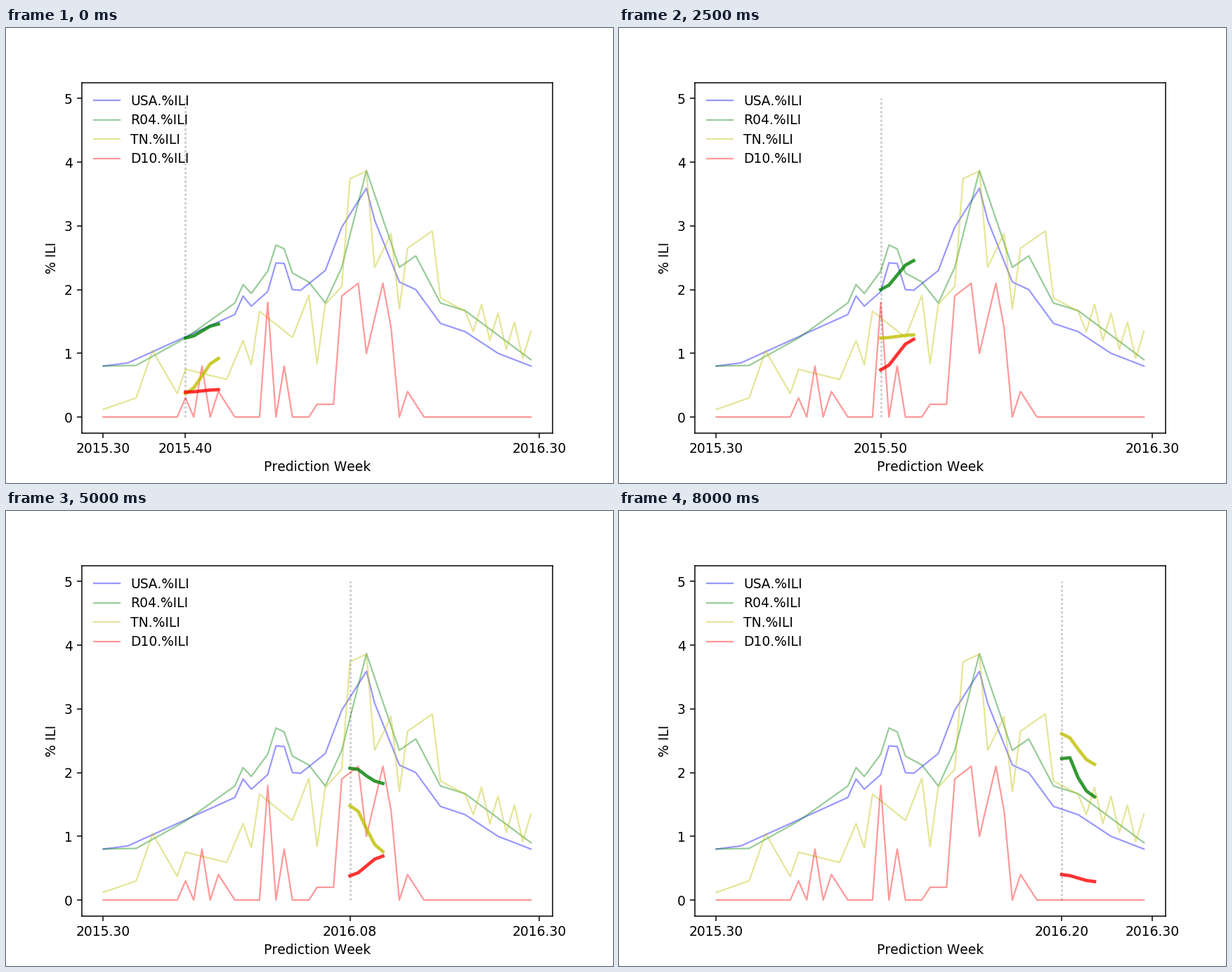
A matplotlib script that plays this animation: 864 px wide and 648 px high, repeating every 8250 ms.

```python
import numpy as np
import matplotlib.pyplot as plt
from matplotlib.animation import FuncAnimation

FRAMES, INTERVAL = 33, 250
FIRST, WEEKS, LEADS = 10, 53, 5
TOP = 5

plt.rcParams['text.kerning_factor'] = 6
plt.rcParams['lines.dotted_pattern'] = 1.1, 1.1

x = np.arange(WEEKS)


def curve(*points):
    """Straight runs between (week, value) turning points."""
    return np.interp(x, *zip(*points))


def spike(week, height, fall=1):
    """One-week rise to a peak, then a fall of the given length."""
    d = x - week
    return height * np.clip(1 - np.where(d < 0, -d, d / fall), 0, 1)


usa = curve((0, .8), (3, .85), (16, 1.61), (17, 1.9), (18, 1.74), (20, 1.97),
            (21, 2.42), (22, 2.41), (23, 2), (24, 1.99), (27, 2.3), (29, 2.98),
            (32, 3.59), (33, 3.09), (36, 2.12), (38, 2), (41, 1.47),
            (44, 1.34), (48, 1), (52, .8))

region = curve((0, .8), (4, .81), (10, 1.24), (16, 1.79), (17, 2.08),
               (18, 1.94), (20, 2.29), (21, 2.7), (22, 2.64), (23, 2.26),
               (25, 2.12), (27, 1.79), (29, 2.35), (32, 3.87), (36, 2.35),
               (38, 2.53), (41, 1.79), (44, 1.67), (52, .9))

# Weekly reporting jitter takes over once the season fades
state = curve((0, .12), (4, .3), (6, 1.04), (9, .37), (10, .75), (15, .59),
              (17, 1.2), (18, .82), (19, 1.66), (23, 1.25), (25, 1.91),
              (26, .84), (27, 1.77), (29, 2.05), (30, 3.74), (32, 3.86),
              (33, 2.35), (35, 2.88), (36, 1.7), (37, 2.65), (40, 2.92),
              (41, 1.87), (52, 1.1))
state += np.where(x > 44, .25 * (-1.) ** x, 0)

district = curve((25, 0), (26, .2), (28, .2), (29, 1.9), (31, 2.1), (32, 1),
                 (34, 2.1), (35, 1.4), (36, 0))
district += (spike(10, .3) + spike(12, .8) + spike(14, .4, 2)
             + spike(20, 1.8) + spike(22, .8) + spike(37, .4, 2))

SERIES = [('USA.%ILI', 'b', usa), ('R04.%ILI', 'g', region),
          ('TN.%ILI', 'y', state), ('D10.%ILI', 'r', district)]

# Overshoot factor, then first and last forecast value at the key steps
STEPS = 0, 8, 12, 20, 24, 28, 32
FORECASTS = {
    'g': (.3, (1.24, 1.73, 2.27, 2.07, 4.56, 2.50, 2.22),
          (1.46, 3.48, 1.43, 1.83, 2.78, 1.83, 1.62)),
    'y': (.05, (.37, 1.02, 1.46, 1.48, 3.36, 2.42, 2.61),
          (.92, 1.99, .59, .76, 1.72, 1.08, 2.13)),
    'r': (0, (.39, .43, 1.05, .38, 1.31, 1.13, .40),
          (.43, .80, 1.64, .69, .88, 1.02, .29)),
}


def forecast(color, step):
    """Eased run from first to last value; steep falls overshoot at lead 1."""
    bump, starts, ends = FORECASTS[color]
    start, end = np.interp(step, STEPS, starts), np.interp(step, STEPS, ends)
    t = np.linspace(0, 1, LEADS)
    values = start + (end - start) * t * t * (3 - 2 * t)
    values[1] += bump * max(0, start - end) ** 2
    return values


def week_label(i):
    year, week = divmod(i + 29, 52)
    return f'{2015 + year}.{week + 1:02d}'


fig, ax = plt.subplots(figsize=(6.4, 4.8), dpi=135)
for label, color, values in SERIES:
    ax.plot(x, values, color, lw=1.2, alpha=.4, label=label)
marker, = ax.plot([], [], 'k:', alpha=.2)
paths = {c: ax.plot([], [], c, lw=2.5, alpha=.8)[0] for c in FORECASTS}

margin = .05 * (WEEKS - 1)
ax.set_xlim(-margin, WEEKS - 1 + margin)
ax.set_xlabel('Prediction Week')
ax.set_ylabel('% ILI')
ax.legend(loc='upper left', frameon=False, labelspacing=.455)


def update(step):
    now = FIRST + step
    marker.set_data([now, now], [0, TOP])
    top = TOP
    for color, path in paths.items():
        values = forecast(color, step)
        path.set_data(np.arange(now, now + LEADS), values)
        top = max(top, *values)
    ax.set_ylim(-.05 * top, 1.05 * top)
    ax.set_xticks([0, now, WEEKS], ['2015.30', week_label(now), '2016.30'])
    return [marker, *paths.values()]


anim = FuncAnimation(fig, update, frames=FRAMES, interval=INTERVAL,
                     repeat=True, repeat_delay=0, blit=False)
plt.show()
```
